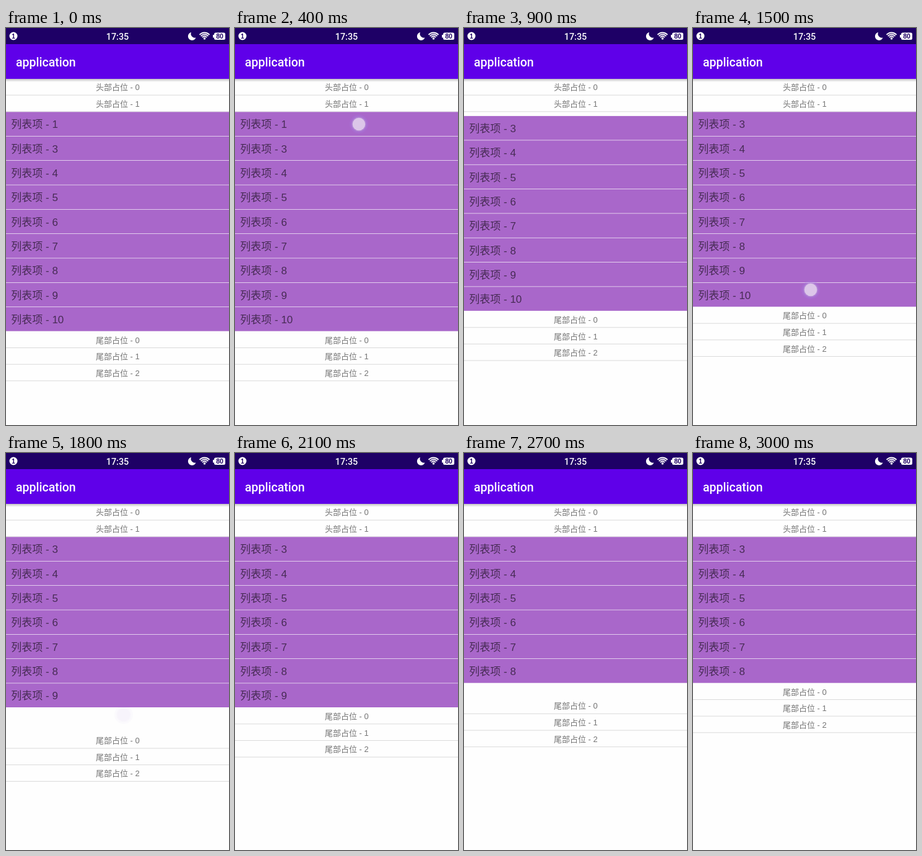
An HTML page with a canvas that plays this animation: 360 by 640 pixels, repeating every 3100 ms.

```html
<!DOCTYPE html>
<html lang="zh">
<head>
<meta charset="utf-8">
<style>
  html, body { margin: 0; width: 100%; height: 100%; overflow: hidden; background: #fefefe; }
  canvas { display: block; }
</style>
</head>
<body>
<canvas id="stage" width="360" height="640"></canvas>
<script>
const ctx = document.getElementById('stage').getContext('2d');
const LOOP = 3100, STEP = 100;
const FADE = 100, SLIDE_DELAY = 120, SLIDE = 250;
const ITEM_H = 118 / 3, SPACER_H = 80 / 3, LINE = 2 / 3, LIST_TOP = 82;
const LIST_FONT = '"Liberation Sans", "Noto Sans CJK SC", "Noto Sans CJK", sans-serif';
const WHITE = '#fefefe', STATUS = '#1e0066';

// Each tap fades its item out, then the rows below slide up.
const taps = [
  { item: 1, down: 400, up: 550, remove: 597, x: 200, y: 155 },
  { item: 10, down: 1500, up: 1720, remove: 1670, x: 190, y: 422 },
  { item: 9, down: 2400, up: 2510, remove: 2468, x: 212, y: 390 },
];
const items = [1, 3, 4, 5, 6, 7, 8, 9, 10];

const clamp = v => Math.min(1, Math.max(0, v));
const ease = v => (1 - Math.cos(Math.PI * clamp(v))) / 2;

function rect(x, y, w, h, color) {
  ctx.fillStyle = color;
  ctx.fillRect(x, y, w, h);
}

function disc(x, y, r, color) {
  ctx.fillStyle = color;
  ctx.beginPath();
  ctx.arc(x, y, r, 0, Math.PI * 2);
  ctx.fill();
}

function text(str, x, baseline, font, color, align = 'left') {
  ctx.font = font;
  ctx.fillStyle = color;
  ctx.textAlign = align;
  ctx.fillText(str, x, baseline);
}

function drawSpacer(label, y) {
  text(label, 180.3, y + 18.3, `13px ${LIST_FONT}`, '#757575', 'center');
  rect(0, y + SPACER_H - 1, 360, 1, '#dadada');
}

function drawItem(n, y, alpha) {
  ctx.globalAlpha = alpha;
  rect(0, y, 360, ITEM_H - LINE, '#a967ca');
  text(`列表项 - ${n}`, 8.3, y + 26, `17px ${LIST_FONT}`, '#472b55');
  ctx.globalAlpha = 1;
}

function drawList(t) {
  let y = LIST_TOP;
  const spacers = (name, count) => {
    for (let i = 0; i < count; i++, y += SPACER_H) drawSpacer(`${name}占位 - ${i}`, y);
  };
  spacers('头部', 2);
  for (const n of items) {
    const tap = taps.find(tap => tap.item === n);
    const age = tap ? t - tap.remove : -1;
    const alpha = 1 - ease(age / FADE);
    if (alpha > 0) drawItem(n, y, alpha);
    y += ITEM_H * (1 - ease((age - SLIDE_DELAY) / SLIDE));
  }
  spacers('尾部', 3);
}

function drawTouch(t, { down, up, x, y }) {
  const alpha = t < down ? 0 : 1 - clamp((t - up) / 90);
  if (!alpha) return;
  ctx.globalAlpha = alpha;
  disc(x, y, 15, 'rgba(165,125,225,.28)');
  disc(x, y, 12, 'rgba(200,180,225,.3)');
  disc(x, y, 10.3, 'rgba(232,218,238,.78)');
  ctx.globalAlpha = 1;
}

function drawStatusBar() {
  rect(0, 0, 360, 26, STATUS);
  disc(12, 13, 6.5, '#fff');
  text('1', 12, 16.5, 'bold 10px "Liberation Sans", sans-serif', STATUS, 'center');
  text('17:35', 180, 18.6, '500 14.4px Roboto, sans-serif', '#fff', 'center');

  // Moon
  ctx.fillStyle = '#fff';
  ctx.fill(new Path2D('M299 7 A6.5 6.5 0 1 0 306.5 15.5 A6.3 6.3 0 0 1 299 7Z'));

  // Wi-Fi
  ctx.strokeStyle = '#fff';
  ctx.lineWidth = 1.8;
  for (const r of [5, 8, 11]) {
    ctx.beginPath();
    ctx.arc(320.5, 18.5, r, -Math.PI * 0.76, -Math.PI * 0.24);
    ctx.stroke();
  }
  disc(320.5, 17, 1.8, '#fff');

  // Battery
  ctx.fillStyle = '#fff';
  ctx.beginPath();
  ctx.roundRect(336, 7.5, 18, 11.5, 2.5);
  ctx.fill();
  rect(334, 11, 2, 4.5, '#fff');
  text('80', 345, 17, 'bold 10.5px "Liberation Sans", sans-serif', STATUS, 'center');
}

function drawAppBar() {
  const shadow = ctx.createLinearGradient(0, 82, 0, 87);
  shadow.addColorStop(0, 'rgba(0,0,0,.24)');
  shadow.addColorStop(1, 'rgba(0,0,0,0)');
  rect(0, 82, 360, 5, shadow);
  rect(0, 26, 360, 56, '#5f00e9');
  text('application', 16, 62, '500 19.5px Roboto, sans-serif', '#fff');
}

function draw(t) {
  rect(0, 0, 360, 640, WHITE);
  drawList(t);
  for (const tap of taps) drawTouch(t, tap);
  drawStatusBar();
  drawAppBar();
}

function tick() {
  const t = performance.now() % LOOP;
  draw(Math.floor(t / STEP) * STEP);
  requestAnimationFrame(tick);
}
tick();
</script>
</body>
</html>
```
